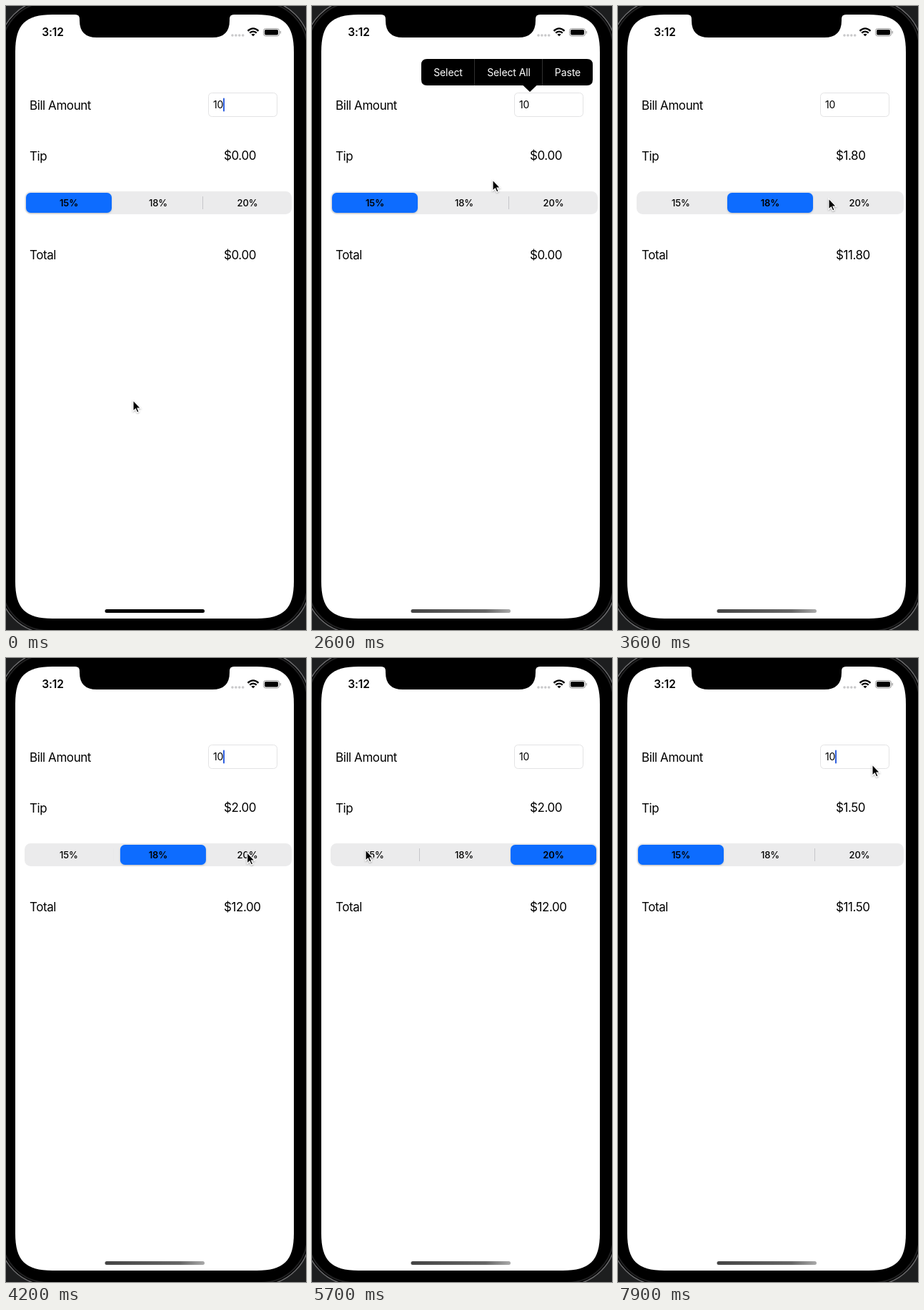
Animation, 420 px wide and 872 px high, one loop 8000 ms. Source, as an HTML page:

```html
<!DOCTYPE html>
<html lang="en">
<head>
<meta charset="utf-8">
<title>Tip calculator</title>
<style>
  html, body { margin: 0; width: 100%; height: 100%; overflow: hidden; background: #1d1e1f; }
  svg { display: block; font: 17px Inter, sans-serif; letter-spacing: -.43px; }
  .mid { text-anchor: middle; }
  .seg { font-size: 13px; font-weight: 500; letter-spacing: -.1px; }
  .menu { font-size: 14px; letter-spacing: -.1px; fill: #fff; }
</style>
</head>
<body>
<svg width="420" height="872" viewBox="0 0 420 872">
  <defs>
    <linearGradient id="shade">
      <stop offset="0" stop-color="#444"/>
      <stop offset=".75" stop-color="#666"/>
      <stop offset="1" stop-color="#aaa"/>
    </linearGradient>
    <filter id="soft" x="-20%" y="-30%" width="140%" height="160%">
      <feDropShadow dx="0" dy="1" stdDeviation="1.2" flood-opacity=".18"/>
    </filter>
    <filter id="lift" x="-50%" y="-50%" width="200%" height="200%">
      <feDropShadow dx="0" dy="1" stdDeviation=".8" flood-opacity=".35"/>
    </filter>
  </defs>

  <!-- phone -->
  <rect width="420" height="872" fill="#1d1e1f"/>
  <rect x="-9" y="-8" width="434" height="884" rx="68" stroke="#6c6c6e" stroke-width="1.4"/>
  <rect x="-6" y="-5" width="428" height="878" rx="65" fill="none" stroke="#202021" stroke-width="2"/>
  <path d="M13 64C13 26 27 12 65 12H351C389 12 403 26 403 64V804C403 842 389 856 351 856H65C27 856 13 842 13 804Z" fill="#fff"/>
  <path d="M97 11V12Q103 12 103 18V20Q103 44 127 44H289Q313 44 313 20V18Q313 12 319 12V11Z"/>
  <rect id="home" x="138.500" y="843" width="139.500" height="5" rx="2.500"/>

  <!-- status bar -->
  <text class="mid" x="65.500" y="42.300" font-size="15.500" font-weight="600" letter-spacing="-.1">3:12</text>
  <path d="M317 41H332" stroke="#c9c9cb" stroke-width="3.600" stroke-linecap="round" stroke-dasharray="0 4.900"/>
  <g fill="none" stroke="#000" stroke-width="2.300">
    <path d="M338.500 34.800Q346 28 353.500 34.800M341.200 37.700Q346 33.500 350.800 37.700"/>
    <path d="M346 42.300L343.400 39.700Q346 37.700 348.600 39.700Z" fill="#000" stroke="none"/>
    <rect x="360.500" y="31.500" width="22" height="10.500" rx="3.200" stroke="#999" stroke-width="1"/>
    <rect x="362" y="33" width="19" height="7.500" rx="1.800" fill="#000" stroke="none"/>
    <path d="M384.300 35V38.600" stroke="#999" stroke-width="1.200"/>
  </g>

  <!-- form -->
  <text x="33" y="145">Bill Amount</text>
  <text x="33" y="216">Tip</text>
  <text x="33" y="354">Total</text>
  <text id="tip" x="305" y="215"></text>
  <text id="total" x="305" y="354"></text>
  <rect x="283.500" y="121.500" width="96" height="33" rx="5" fill="#fff" stroke="#e3e3e4"/>
  <text x="290" y="143.300" font-size="14" letter-spacing="-.15">10</text>
  <rect id="caret" x="304" y="128.500" width="2" height="19" rx="1" fill="#2f5fdf"/>

  <rect x="26" y="259" width="374" height="32" rx="8.500" fill="#ebebec"/>
  <path id="leftLine" d="M150.500 266V284" stroke="#c6c6c9"/>
  <path id="rightLine" d="M275.500 266V284" stroke="#c6c6c9"/>
  <rect id="thumb" x="28" y="261" width="120" height="28" rx="6.500" fill="#0a6cff" filter="url(#soft)"/>
  <text class="seg mid" x="88" y="279.700">15%</text>
  <text class="seg mid" x="213" y="279.700">18%</text>
  <text class="seg mid" x="338" y="279.700">20%</text>

  <g id="menu">
    <path d="M161 74H385Q393 74 393 82V103Q393 111 385 111H314.500L305 120L295.500 111H161Q153 111 153 103V82Q153 74 161 74Z"/>
    <path d="M227.500 74V111M322.500 74V111" stroke="#303030"/>
    <text class="menu mid" x="190.500" y="97.500">Select</text>
    <text class="menu mid" x="275.500" y="97.500">Select All</text>
    <text class="menu mid" x="358" y="97.500">Paste</text>
  </g>

  <path id="pointer" d="M0 0V15.200L3.400 12L5.700 17L8.100 15.900L5.900 11H10.500Z" stroke="#fff" stroke-width="1.100" filter="url(#lift)"/>
</svg>
<script>
  const DURATION = 8000, STEP = 100;
  const $ = id => document.getElementById(id);
  const labels = document.querySelectorAll('.seg');
  const clamp = v => Math.min(1, Math.max(0, v));
  const ramp = (t, from, to) => clamp((t - from) / (to - from));
  const ease = (t, from, to) => { const k = ramp(t, from, to); return k * k * (3 - 2 * k); };

  // Pointer stops: time, x, y
  const stops = [
    [0, 178, 551], [300, 95, 455], [500, 150, 330], [800, 355, 152], [1100, 336, 141],
    [2350, 336, 141], [2600, 253, 243], [2900, 213, 271], [3300, 215, 272],
    [3600, 295, 269], [3900, 338, 272], [4400, 337, 272], [4800, 87, 262],
    [5100, 76, 267], [5200, 75, 268], [6250, 75, 268], [6600, 329, 216],
    [6900, 342, 336], [7100, 347, 345], [7350, 358, 260], [7650, 366, 158], [7900, 356, 149], [8000, 356, 149]
  ];

  // Monotone cubic through the stops
  const slope = (i, axis) => (stops[i + 1][axis] - stops[i][axis]) / (stops[i + 1][0] - stops[i][0]);
  function tangent(i, axis) {
    if (i === 0 || i === stops.length - 1) return 0;
    const a = slope(i - 1, axis), b = slope(i, axis);
    return a * b > 0 ? 2 * a * b / (a + b) : 0;
  }
  function along(t, axis) {
    const i = stops.findIndex(s => s[0] > t) - 1;
    const p = stops[i], q = stops[i + 1], span = q[0] - p[0], k = (t - p[0]) / span;
    const blend = k * k * (3 - 2 * k);
    return p[axis] + (q[axis] - p[axis]) * blend
      + span * k * (1 - k) * (tangent(i, axis) * (1 - k) - tangent(i + 1, axis) * k);
  }

  function draw(t) {
    const tip = t < 3200 ? 0 : t < 4100 ? 1.8 : t < 6000 ? 2 : 1.5;
    $('tip').textContent = '$' + tip.toFixed(2);
    $('total').textContent = '$' + (tip ? 10 + tip : 0).toFixed(2);

    const choice = ease(t, 3150, 3500) + ease(t, 4150, 4500) - 2 * ease(t, 5950, 6350);
    $('thumb').setAttribute('x', 28 + 125 * choice);
    $('leftLine').style.opacity = clamp(choice - 1);
    $('rightLine').style.opacity = clamp(1 - choice);
    labels.forEach((label, i) => label.style.fontWeight = Math.round(choice) === i ? 600 : 500);

    const blink = t % 1000;
    $('caret').style.opacity = 1 - ramp(blink, 350, 550) + ramp(blink, 750, 850);
    $('menu').style.opacity = ramp(t, 1185, 1580) - ramp(t, 2880, 3120);
    $('home').setAttribute('fill', t < 500 ? '#000' : 'url(#shade)');
    $('pointer').setAttribute('transform', `translate(${along(t, 1)} ${along(t, 2)})`);
  }

  function tick() {
    draw(Math.floor(performance.now() % DURATION / STEP) * STEP);
    requestAnimationFrame(tick);
  }
  tick();
</script>
</body>
</html>
```
